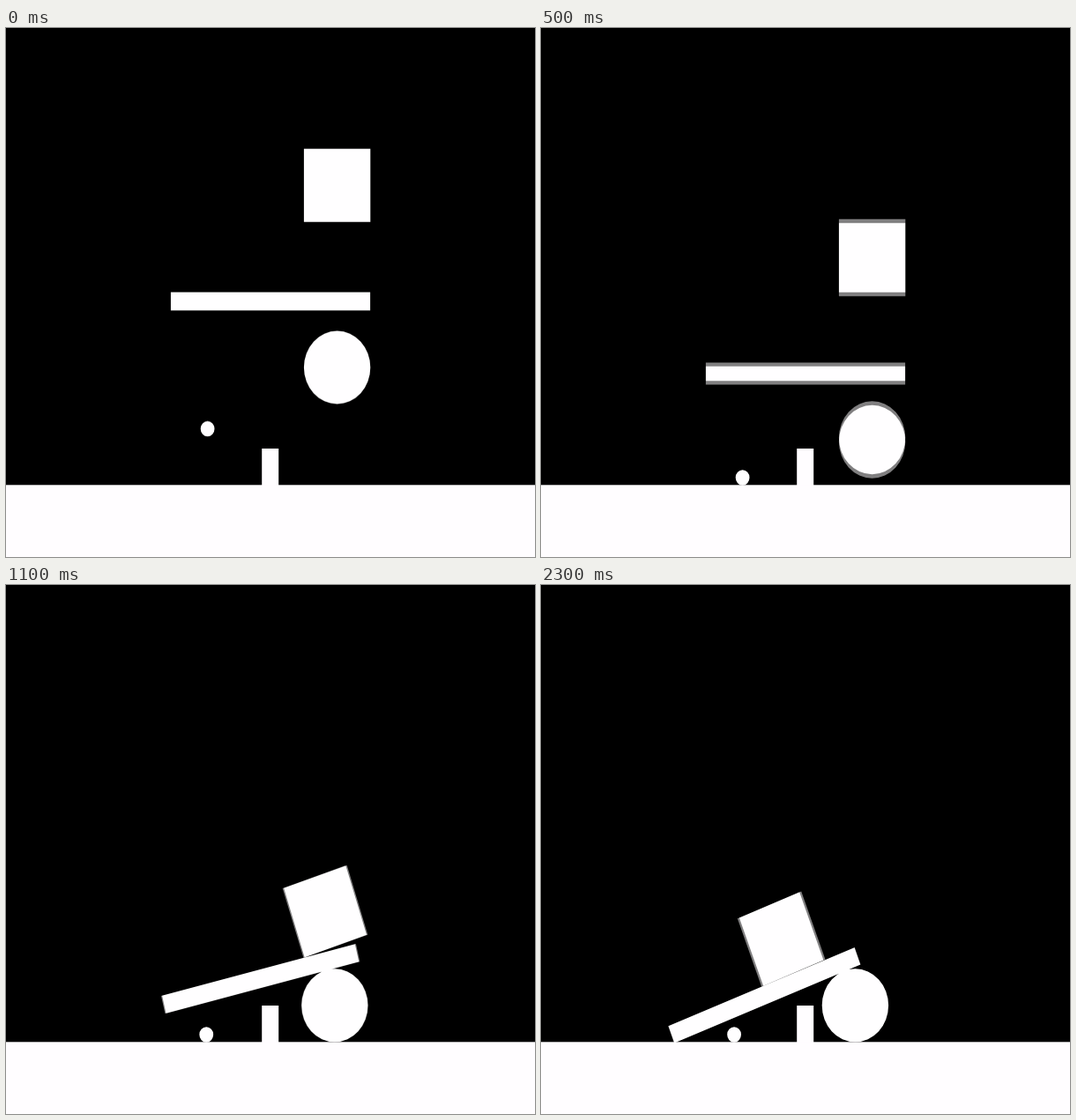
An HTML page with a canvas that plays this animation: 600 px wide and 600 px high, repeating every 2.4 s.

```html
<!DOCTYPE html>
<html lang="en">
<head>
<meta charset="utf-8">
<title>Falling blocks</title>
<style>
html, body { margin: 0; width: 100%; height: 100%; overflow: hidden; background: #000; }
canvas { display: block; width: 600px; height: 600px; }
</style>
</head>
<body>
<canvas id="stage" width="600" height="600"></canvas>
<script>
const ctx = document.getElementById('stage').getContext('2d');
const LOOP = 2400, STEP = 100;
const TALL = 1.1;                 // vertical stretch of the whole scene
const WHITE = '#fffdff';
const FLOOR = 518.3;
const R = 37.7;                   // ball radius and half the box side
const HALF = R / 4;               // half the bar thickness
const { min, max, sin, cos, abs, PI } = Math;

const clamp = (v, lo, hi) => max(lo, min(hi, v));
const since = (t, from) => max(0, t - from);
const drop = t => 1.269e-4 * ((t + 396) ** 2 - 396 ** 2);

function ease(t, from, to) {
  const p = clamp((t - from) / (to - from), 0, 1);
  return p * p * (3 - 2 * p);
}

// height above a pivot of a point dx away, held at distance d from a sloped line
const lift = (d, dx, angle) => TALL * (d + dx * sin(angle)) / cos(angle);

function ballAt(t) {
  return {
    x: 375.6 - 14.3 * ease(t, 880, 1800) - .0035 * since(t, 900),
    y: min(385 + drop(t), FLOOR - R * TALL)
  };
}

function pebbleAt(t) {
  return { x: 228.6 - .0068 * since(t, 900), y: min(454.6 + drop(t), 510) };
}

// Falls, tips over the ball, is knocked back by the box, then settles.
function barAt(t, ball) {
  const angle = clamp(.00187 * (t - 640), 0, .33)
    - .092 * ease(t, 840, 1100) + .128 * ease(t, 1100, 1750);
  const x = 300 - 29.4 * ease(t, 750, 1850) - .01075 * since(t, 700);
  const rest = ball.y - lift(R + HALF - .5, x - ball.x, angle);
  return { x, y: min(310 + drop(t), rest), angle };
}

// Falls onto the bar, then slides down it.
function boxAt(t, bar) {
  const angle = .32 * ease(t, 850, 1100) + .05 * ease(t, 1500, 1850);
  const x = 375.6 - .0565 * since(t, 860) - .026 * since(t, 1470);
  const tilt = angle - bar.angle;
  const reach = R * (cos(tilt) + abs(sin(tilt)));
  const rest = bar.y - lift(HALF + reach, x - bar.x, bar.angle);
  return { x, y: min(178.5 + drop(t), rest), angle };
}

function addRect({ x, y, angle }, w, h) {
  ctx.save();
  ctx.translate(x, y);
  ctx.scale(1, TALL);
  ctx.rotate(-angle);
  ctx.rect(-w / 2, -h / 2, w, h);
  ctx.restore();
}

function addBall({ x, y }, r) {
  ctx.moveTo(x + r, y);
  ctx.ellipse(x, y, r, r * TALL, 0, 0, PI * 2);
}

function drawPose(t) {
  const ball = ballAt(t), bar = barAt(t, ball);
  ctx.beginPath();
  addRect(bar, R * 6, HALF * 2);
  addRect(boxAt(t, bar), R * 2, R * 2);
  addBall(ball, R);
  addBall(pebbleAt(t), 7.9);
  ctx.fill();
}

function render(t) {
  ctx.globalCompositeOperation = 'source-over';
  ctx.globalAlpha = 1;
  ctx.fillStyle = '#000';
  ctx.fillRect(0, 0, 600, 600);

  // two half-bright poses give the soft trailing edges
  const gap = min(25, 6 + .027 * t);
  ctx.fillStyle = WHITE;
  ctx.globalCompositeOperation = 'lighter';
  ctx.globalAlpha = .5;
  drawPose(t - gap / 2);
  drawPose(t + gap / 2);

  ctx.globalCompositeOperation = 'source-over';
  ctx.globalAlpha = 1;
  ctx.fillRect(290.2, 477, 19, 42);
  ctx.fillRect(0, FLOOR, 600, 600 - FLOOR);
}

const start = performance.now();
function tick() {
  const t = (performance.now() - start) % LOOP;
  render(Math.floor(t / STEP) * STEP);
  requestAnimationFrame(tick);
}
tick();
</script>
</body>
</html>
```
